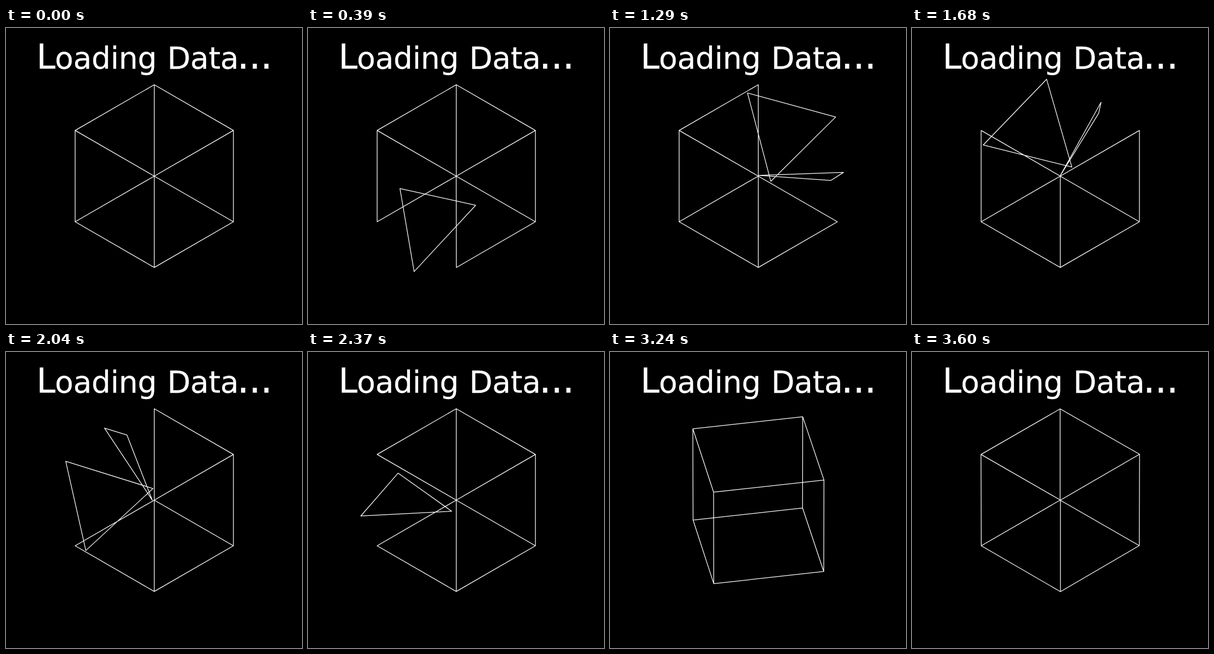
These frames come from a looping animation (540 by 540 pixels, 3.63 s). An HTML page:

```html
<!DOCTYPE html>
<html lang="en">
<head>
<meta charset="utf-8">
<title>Loading Data</title>
<style>
  html, body { margin: 0; width: 100%; height: 100%; overflow: hidden; background: #000; }
  svg { display: block; width: 100vw; height: 100vh; }
  text { fill: #fff; stroke: #fff; stroke-width: .3; font: 55px Verdana, "DejaVu Sans", sans-serif; }
  .cap { font-size: 62px; }
  .word { letter-spacing: -.3px; }
  .dots { font-size: 70px; letter-spacing: -1px; }
  path { fill: none; stroke: #fff; stroke-width: 1.25; stroke-linejoin: round; stroke-linecap: round; }
</style>
</head>
<body>
<svg viewBox="0 0 540 540">
  <text class="cap" x="55.7" y="74">L</text>
  <text class="word" x="89.3" y="74">oading</text>
  <text class="word" x="294.2" y="74">Data</text>
  <text class="dots" x="421.5" y="74">...</text>
  <path id="wire"/>
</svg>
<script>
const STEP = 30, FRAMES = 121, CUBE_START = 90, STAGGER = 12.73;
const CX = 270.5, CY = 270.2, SIDE = 166.7;
const R = SIDE / Math.sqrt(3);      // circumradius of one triangle
const RAD = Math.PI / 180;
const wire = document.getElementById('wire');

// [frame, degrees] keys of the in-plane spin and of the flip about the spoke
const SPIN = [[0, 0], [4.6, 13.8], [8.35, 36.6], [12.27, 68.5], [17.3, 110.6], [20.5, 119], [23, 120]];
const FLIP = [[5, 0], [12.27, 27.5], [17.3, 82.2], [25, 166.7], [28.5, 180]];

function slope(keys, i) {
  const a = keys[i - 1], b = keys[i + 1];
  return a && b ? (b[1] - a[1]) / (b[0] - a[0]) : 0;
}

// smooth curve through the keys, flat at both ends
function curve(keys, n) {
  const last = keys.length - 1;
  if (n <= keys[0][0]) return keys[0][1];
  if (n >= keys[last][0]) return keys[last][1];
  let i = 0;
  while (n > keys[i + 1][0]) i++;
  const [x0, y0] = keys[i], [x1, y1] = keys[i + 1];
  const h = x1 - x0, u = (n - x0) / h, v = 1 - u;
  return y0 * v * v * (1 + 2 * u) + y1 * u * u * (1 + 2 * v)
    + h * u * v * (slope(keys, i) * v - slope(keys, i + 1) * u);
}

const line = (pts, close) =>
  'M' + pts.map(p => p.map(c => c.toFixed(2)).join(' ')).join('L') + (close ? 'Z' : '');

function triangle(i, frame) {
  const n = frame - i * STAGGER;
  const spin = curve(SPIN, n), squash = Math.cos(curve(FLIP, n) * RAD);
  const dir = (120 - 60 * i) * RAD, dx = Math.cos(dir), dy = Math.sin(dir);
  return line([180, -60, 60].map(home => {
    const a = (home - spin) * RAD;
    const r = R + R * Math.cos(a), t = R * Math.sin(a) * squash;
    return [CX + r * dx - t * dy, CY + r * dy + t * dx];
  }), true);
}

function cube(frame) {
  const q = Math.pow((frame - CUBE_START) / (FRAMES - CUBE_START), 1.53);
  const turn = -90 * q * q * q * (10 - 15 * q + 6 * q * q);
  const corner = (k, up) => {
    const a = (turn + 90 * k) * RAD, c = Math.cos(a);
    const depth = SIDE * Math.SQRT1_2 * (up / 2 + c);
    const s = 1 + depth / 34000;
    return [CX + s * SIDE * Math.sqrt(0.75) * Math.sin(a), CY + s * SIDE / 2 * (c - up)];
  };
  const ks = [0, 1, 2, 3];
  return [1, -1].map(up => line(ks.map(k => corner(k, up)), true)).join('')
    + ks.map(k => line([corner(k, 1), corner(k, -1)])).join('');
}

function draw(now) {
  const frame = Math.floor(now / STEP) % FRAMES;
  wire.setAttribute('d', frame > CUBE_START
    ? cube(frame)
    : [0, 1, 2, 3, 4, 5].map(i => triangle(i, frame)).join(''));
}

let start;
function tick(now) {
  if (start === undefined) start = now;
  draw(Math.max(0, now - start));
  requestAnimationFrame(tick);
}
draw(0);
requestAnimationFrame(tick);
</script>
</body>
</html>
```
